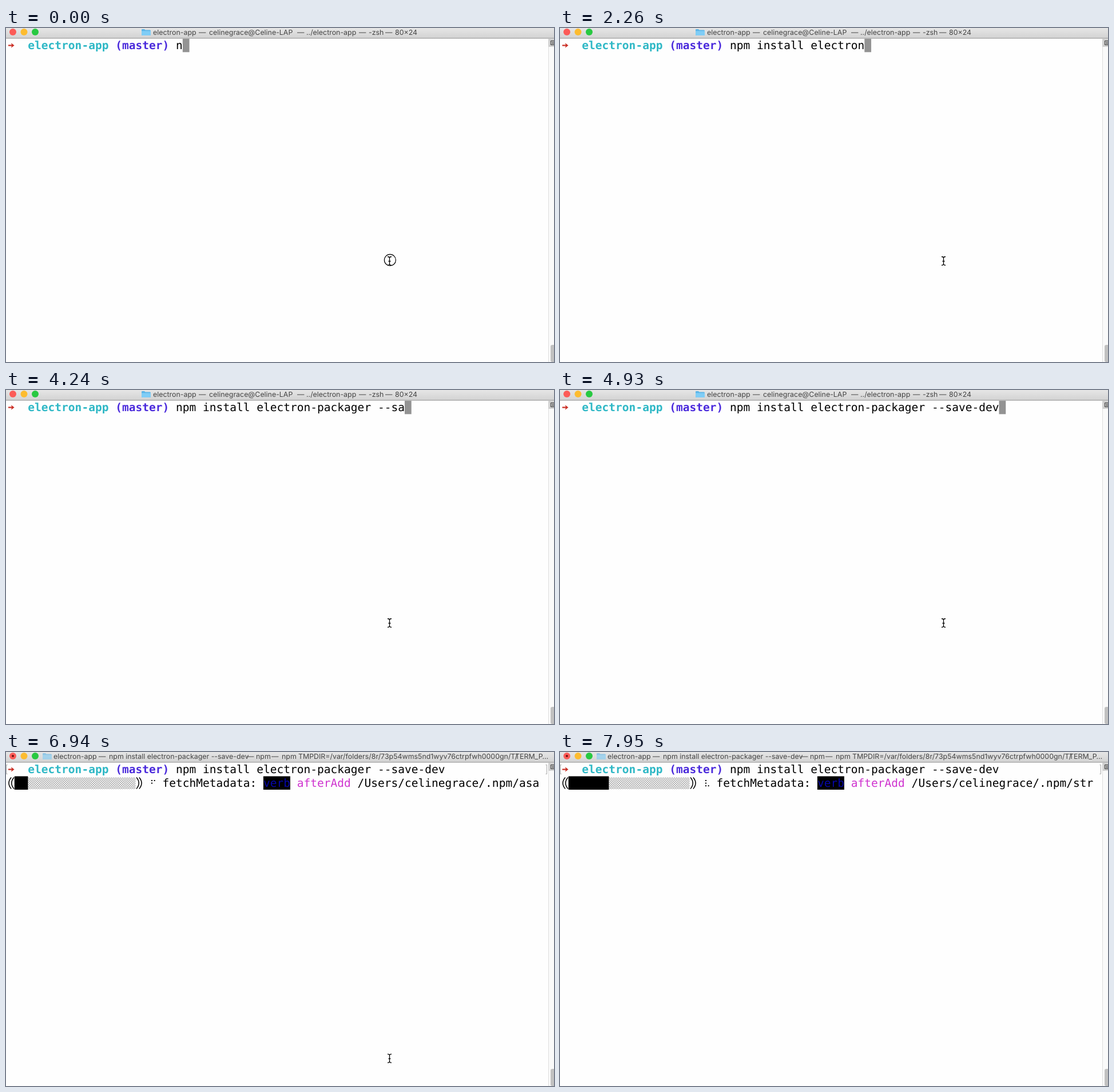
An HTML page that plays this animation: 958x585 px, repeating every 8000 ms.

```html
<!DOCTYPE html>
<html lang="en">
<head>
<meta charset="utf-8">
<title>Terminal</title>
<style>
  html, body { margin: 0; width: 100%; height: 100%; overflow: hidden; background: #fefefe; }
  svg { display: block; width: 958px; height: 585px; }
  text { white-space: pre; text-rendering: geometricPrecision; }
  .term text { font: 19.53px "DejaVu Sans Mono", "Liberation Mono", monospace; }
  .term .bold { font-weight: bold; }
  .bar text { font: 12.4px Inter, Roboto, sans-serif; fill: #444; }
</style>
</head>
<body>
<svg viewBox="0 0 958 585">
  <defs>
    <linearGradient id="chrome" x2="0" y2="1">
      <stop stop-color="#e6e6e6"/><stop offset="1" stop-color="#d2d2d2"/>
    </linearGradient>
    <pattern id="shade" x="14.8" y="44.5" width="3.92" height="3.9" patternUnits="userSpaceOnUse">
      <path d="M.4 .3h1.2v1.4h-1.2zM2.36 2.25h1.2v1.4h-1.2z" fill="#444"/>
    </pattern>
    <g id="folder">
      <path d="M0 2.2Q0 1 1.2 1H5L6.5 2.5H14.5Q16 2.5 16 4V11Q16 12 15 12H1Q0 12 0 11Z" fill="#5bb5e8"/>
      <path d="M0 4.2H16V11Q16 12 15 12H1Q0 12 0 11Z" fill="#7fcdf6"/>
    </g>
  </defs>
  <rect width="958" height="585" fill="#fefefe"/>

  <g class="bar">
    <rect width="958" height="18" fill="url(#chrome)"/>
    <rect y="17.5" width="958" height="1" fill="#8f8f8f"/>
    <circle cx="12" cy="7" r="6" fill="#fc5b57"/>
    <circle cx="31.5" cy="7" r="6" fill="#fdbc2f"/>
    <circle cx="51" cy="7" r="6" fill="#28c941"/>
    <g id="idleTitle"><use href="#folder" x="237" y="1"/></g>
    <g id="busyTitle">
      <circle cx="12" cy="7" r="2" fill="#6d120f"/>
      <use href="#folder" x="64" y="1" opacity=".6"/>
    </g>
  </g>

  <rect x="948" y="19" width="10" height="566" fill="#fafafa"/>
  <rect x="948" y="19" width="1" height="566" fill="#dedede"/>
  <rect x="948" y="19" width="10" height="14" fill="#d0d0d0"/>
  <path d="M958 22.5H952.5V29.5H958M954 25H958M954 27.3H958" fill="none" stroke="#333"/>
  <rect x="952" y="555" width="10" height="30" rx="3" fill="#c1c1c1"/>

  <g class="term">
    <path d="M4 30.5H11" stroke="#cb3127" stroke-width="2.2"/>
    <path d="M9 26.2L14.6 30.5L9 34.8L10.2 30.5Z" fill="#cb3127"/>
    <g id="prompt"></g>
    <text id="command" y="37"></text>
    <rect id="caret" width="11.76" height="23.5" fill="#939393"/>
    <path id="marks" d="M2.5 22.5H.7V38.5H2.5M943.5 22.5H945.4V38.5H943.5" fill="none" stroke="#a5a5a5"/>
    <g id="status">
      <path d="M9.2 44.5Q.7 54.5 9.2 64.5M14 44.5Q5.5 54.5 14 64.5M228 44.5Q236.5 54.5 228 64.5M232.8 44.5Q241.3 54.5 232.8 64.5"
        fill="none" stroke="#000" stroke-width="1.5"/>
      <rect x="14.8" y="44.5" width="211.7" height="20.5" fill="url(#shade)"/>
      <rect id="done" x="14.8" y="42.5" height="23.5"/>
      <g id="dots"></g>
      <rect x="449.9" y="42.5" width="47" height="23.5"/>
      <text id="phase" y="61"></text>
      <text id="level" y="61"></text>
      <text id="task" y="61" fill="#cf33cf"></text>
      <text id="detail" y="61"></text>
    </g>
  </g>

  <g id="mouse" fill="none" stroke="#000" stroke-width="1.3">
    <path d="M667 400.5Q670.5 400.5 670.5 403V413Q670.5 415.5 667 415.5M674 400.5Q670.5 400.5 670.5 403M670.5 413Q670.5 415.5 674 415.5M668.5 408.5H672.5"/>
    <circle id="ring" cx="671.4" cy="406.4" r="10" stroke-width="1.2"/>
  </g>
</svg>
<script>
const LOOP = 8000, ENTER = 5170, BUSY = 5290, STATUS = 5830, FETCH = 6540;
const NS = 'http://www.w3.org/2000/svg';
const COMMAND = 'npm install electron-packager --save-dev';
const FIRST_COL = 25;
const $ = id => document.getElementById(id);
const colX = col => 3 + col * 11.762;
const show = (id, on) => $(id).setAttribute('visibility', on ? 'visible' : 'hidden');

function add(parent, tag, attrs) {
  const el = document.createElementNS(NS, tag);
  for (const key in attrs) el.setAttribute(key, attrs[key]);
  return $(parent).appendChild(el);
}

// Places text on the terminal's character grid.
function write(el, col, text) {
  if (el.textContent === text) return;
  el.setAttribute('x', [...text].map((_, i) => colX(col + i)).join(' '));
  el.textContent = text;
}

function title(id, parts) {
  for (const [x, text] of parts) add(id, 'text', { x, y: 11.5 }).textContent = text;
}
title('idleTitle', [[257, 'electron-app'], [337, '—'], [355, 'celinegrace@Celine-LAP'], [509, '—'],
  [525, '../electron-app'], [617, '—'], [634, '-zsh'], [663, '—'], [680, '80×24']]);
title('busyTitle', [[83, 'electron-app'], [162, '—'], [180, 'npm install electron-packager --save-dev'],
  [421, '—'], [437, 'npm'], [464, '—'], [482, 'npm'],
  [511, 'TMPDIR=/var/folders/8r/73p54wms5nd1wyv76ctrpfwh0000gn/T/'], [890, 'TERM_P…']]);

write(add('prompt', 'text', { y: 37, class: 'bold', fill: '#2fb8c6' }), 3, 'electron-app');
write(add('prompt', 'text', { y: 37, class: 'bold', fill: '#4b2bdc' }), 16, '(master)');

// Bursts of steps: first time, last time, count.
const spread = bursts => bursts.flatMap(([from, to, n]) =>
  Array.from({ length: n }, (_, i) => from + (n > 1 ? (to - from) * i / (n - 1) : 0)));
const keys = spread([[60, 270, 3], [420, 480, 2], [630, 630, 1], [780, 840, 2], [1020, 1190, 3],
  [1370, 1550, 3], [1730, 1730, 1], [2000, 2110, 2], [2260, 2260, 2], [2470, 2700, 3],
  [2850, 3150, 4], [3300, 3470, 3], [3650, 3770, 2], [4010, 4600, 6], [4780, 4780, 1], [4930, 4930, 1]]);
const updates = spread([[FETCH, 7170, 10], [7370, 7460, 2], [7540, 7950, 6]]);
const passed = (times, t) => times.filter(time => time <= t + 0.01).length;

const packages = 'ele deb ext get asa min pat plu pif ram tra rcn yar sem res mkd str'.split(' ');

// Braille spinner; dots 1-3 run down the left column, 4-6 down the right.
const spinner = ['124', '145', '1456', '456', '3456', '356', '236', '1236', '123', '1234'];
const dots = Array.from({ length: 6 }, (_, i) => add('dots', 'rect', {
  x: 254 + 4.6 * Math.floor(i / 3), y: 49 + 4.6 * (i % 3), width: 2, height: 2
}));

function drawStatus(t) {
  const step = passed(updates, t);
  const fetching = step > 1;
  $('done').setAttribute('width', (step ? Math.floor(1 + 0.3 * step + 1e-6) : 0) * 11.762);
  const lit = spinner[(7 + Math.floor(0.6 * step + 1e-6)) % 10];
  dots.forEach((dot, i) => dot.setAttribute('opacity', lit.includes(i + 1) ? 1 : 0));
  write($('phase'), 23, fetching ? 'fetchMetadata:' : step ? 'loadIdealTree:' : 'normalizeTree:');
  write($('level'), 38, fetching ? 'verb' : 'sill');
  $('level').setAttribute('fill', fetching ? '#0606a8' : '#fff');
  write($('task'), 43, fetching ? 'afterAdd' : 'install');
  if (fetching) write($('detail'), 52, '/Users/celinegrace/.npm/' + packages[step - 2]);
  else write($('detail'), 51, step ? 'loadIdealTree' : 'loadCurrentTree');
}

function draw(t) {
  const typed = 1 + passed(keys, t);
  const entered = t >= ENTER;
  write($('command'), FIRST_COL, COMMAND.slice(0, typed));
  $('caret').setAttribute('x', colX(entered ? 0 : FIRST_COL + typed));
  $('caret').setAttribute('y', entered ? 42.5 : 18.8);
  show('caret', t < STATUS);
  show('marks', entered);
  show('idleTitle', t < BUSY);
  show('busyTitle', t >= BUSY);
  show('status', t >= STATUS);
  show('ring', t < 60);
  if (t >= STATUS) drawStatus(t);
  const fall = Math.min(1, Math.max(0, (t - FETCH) / 500));
  $('mouse').setAttribute('transform', `translate(0 ${200 * fall * fall})`);
}

const start = performance.now();
function tick() {
  draw((performance.now() - start) % LOOP);
  requestAnimationFrame(tick);
}
tick();
</script>
</body>
</html>
```
